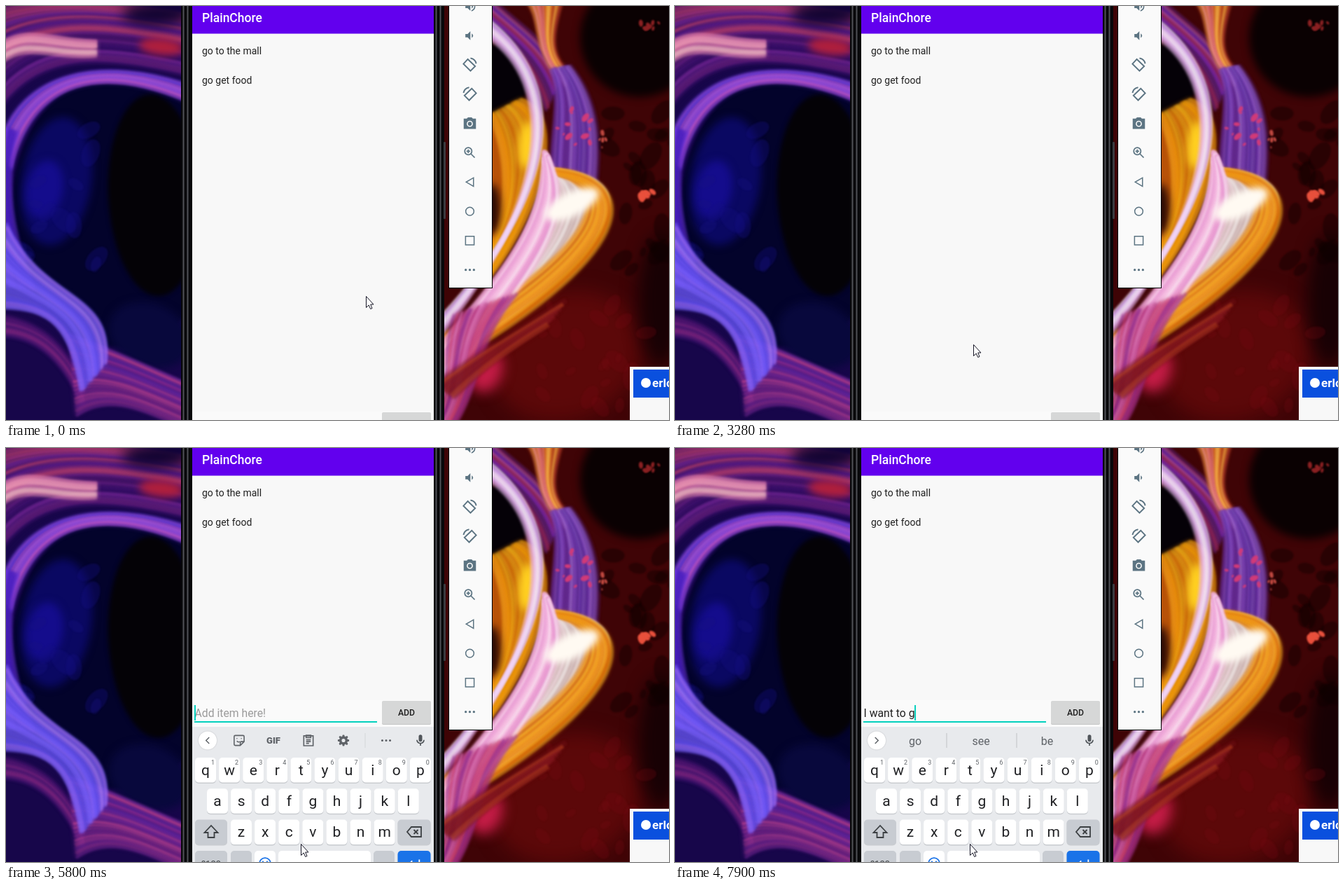
These frames come from a looping animation (947 px wide and 591 px high, 8 s). An HTML page with a canvas:

```html
<!DOCTYPE html>
<html lang="en">
<head>
<meta charset="utf-8">
<title>Todo list on a phone</title>
<style>
html, body { margin: 0; width: 100%; height: 100%; overflow: hidden; background: #000; }
canvas { display: block; }
</style>
</head>
<body>
<canvas id="stage" width="947" height="591"></canvas>
<script>
const W = 947, H = 591, LOOP = 8000, STEP = 120;
const stage = document.getElementById('stage');
let c = stage.getContext('2d');

// ---------- helpers ----------
const numbers = s => s.match(/-?\d+/g).map(Number);
const mix = (a, b, u) => a + (b - a) * u;

let seed = 7;
const random = () => (seed = seed * 16807 % 2147483647) / 2147483647;

function rect(color, x, y, w, h, r = 0) {
  c.fillStyle = color;
  c.beginPath();
  c.roundRect(x, y, w, h, r);
  c.fill();
}

function text(s, x, y, size, color, align = 'left', weight = 400) {
  c.font = `${weight} ${size}px Roboto, sans-serif`;
  c.textAlign = align;
  c.fillStyle = color;
  c.fillText(s, x, y);
}

function disc(color, x, y, r) {
  c.fillStyle = color;
  c.beginPath();
  c.arc(x, y, r, 0, 7);
  c.fill();
}

// Soft ellipse.
function glow(color, x, y, rx, ry, tilt = 0, blur = 6) {
  c.filter = `blur(${blur}px)`;
  c.fillStyle = color;
  c.beginPath();
  c.ellipse(x, y, rx, ry, tilt, 0, 7);
  c.fill();
  c.filter = 'none';
}

// Smoke: overlapping threads blended between two Bezier edges.
function smoke(edgeA, edgeB, colors, count = 22) {
  const a = numbers(edgeA), b = numbers(edgeB);
  const [x0, y0, x1, y1, x2, y2, x3, y3] = b;
  const palette = colors.split(' ');
  c.filter = 'blur(3px)';
  c.globalAlpha = 0.75;
  c.fillStyle = palette[0];
  c.beginPath();
  c.moveTo(a[0], a[1]);
  c.bezierCurveTo(...a.slice(2));
  c.lineTo(x3, y3);
  c.bezierCurveTo(x2, y2, x1, y1, x0, y0);
  c.fill();
  c.filter = 'blur(1.5px)';
  for (let i = 0; i < count; i++) {
    const p = a.map((v, k) => mix(v, b[k], i / (count - 1)));
    c.globalAlpha = 0.2 + 0.4 * random();
    c.strokeStyle = palette[Math.floor(random() * palette.length)];
    c.lineWidth = 2 + 6 * random();
    c.beginPath();
    c.moveTo(p[0], p[1]);
    c.bezierCurveTo(...p.slice(2));
    c.stroke();
  }
  c.filter = 'none';
  c.globalAlpha = 1;
}

function mottle(color, count, size, x, y, w, h) {
  for (let i = 0; i < count; i++) {
    const s = size * (0.4 + random());
    glow(color, x + random() * w, y + random() * h, s, s * 0.6, random() * 3, 1);
  }
}

// Icons live on a 24 unit grid centred on x, y.
function icon(x, y, size, color, d, filled, width = 2) {
  const path = new Path2D(d);
  c.save();
  c.translate(x - size / 2, y - size / 2);
  c.scale(size / 24, size / 24);
  c.fillStyle = c.strokeStyle = color;
  c.lineWidth = width;
  filled ? c.fill(path, 'evenodd') : c.stroke(path);
  c.restore();
}

const ring = (x, y, r) => `M${x - r} ${y}a${r} ${r} 0 1 0 ${2 * r} 0a${r} ${r} 0 1 0 ${-2 * r} 0z`;
const dots = ring(5, 12, 2) + ring(12, 12, 2) + ring(19, 12, 2);

// ---------- still parts ----------
function leftFlames() {
  rect('#17064a', 0, 0, 250, H);
  smoke('-10,0 60,-15 150,-10 260,10', '-10,150 50,60 150,75 260,100', '#571a70 #c2407e #7d2aa0 #2a0a60 #d84a66 #33107a', 30);
  glow('#0d0230', 215, 12, 50, 16, 0, 9);
  glow('#b01f3c', 222, 58, 32, 12, 0.1);
  smoke('-10,55 30,25 70,50 130,50', '-10,85 30,50 60,78 130,72', '#d878a8 #ffd8cc #f0a0b8', 9);

  glow('#03032b', 160, 290, 152, 196, 0, 2);
  glow('#0a0862', 72, 250, 50, 92, 0.15);
  glow('#140c8c', 55, 262, 26, 42, 0.2);
  glow('#08083c', 205, 470, 60, 45, 0.4);
  glow('#040206', 212, 270, 66, 144, -0.05, 3);
  mottle('rgba(22,16,130,.35)', 14, 16, 20, 170, 110, 200);

  smoke('260,112 140,72 20,90 -10,200', '260,138 140,86 40,100 8,235', '#6a34c4 #c86ae8 #5a3ae0 #d85ab8 #9a50e0', 14);
  smoke('-10,170 -20,260 -20,330 -10,400', '18,180 -5,250 10,330 40,405', '#4a20c0 #7038e0 #b048d8', 10);
  smoke('-10,440 40,450 80,470 110,540', '-10,470 40,470 80,500 110,570', '#5a1a78 #8a2a80 #38106a', 10);
  smoke('90,470 150,490 200,515 260,540', '100,585 150,550 200,580 260,605', '#6a228a #b83490 #7a2aa0 #4a22a0 #d04a90', 20);
  smoke('0,310 50,425 155,405 142,510', '-10,430 70,430 92,460 108,550', '#6a58e8 #9a88ff #5a48e8 #b070f0 #7a60ff', 24);
}

function rightFlames() {
  rect('#3f0406', 626, 0, 321, H);
  glow('#5c0809', 800, 500, 110, 90, -0.4, 14);
  glow('#0a0102', 905, 45, 85, 85, 0, 6);
  glow('#180104', 935, 420, 32, 95, 0, 12);
  mottle('rgba(12,0,0,.4)', 24, 16, 855, 140, 95, 260);
  mottle('rgba(120,10,18,.28)', 22, 15, 750, 420, 170, 160);

  glow('#050107', 705, 105, 42, 52, 0, 3);
  smoke('690,-15 720,20 780,50 795,100', '690,40 720,55 755,90 772,150', '#5a1f70 #7a2ad0 #e080d0 #a02858', 16);
  smoke('740,-10 770,20 745,60 800,115', '795,-10 780,40 775,70 805,95', '#d8641c #f08a1e #ffc050 #ff9ac0 #b02a30', 16);
  smoke('778,90 795,130 775,200 780,240', '805,85 850,140 848,200 842,262', '#6a30a8 #9a60d8 #4a1f90 #b888e8', 22);

  glow('#b85208', 690, 265, 34, 100, 0, 4);
  smoke('690,155 715,210 720,290 690,350', '735,132 800,150 775,280 690,390', '#e88c10 #ffc41c #d86a0a #ffae00 #f0a020', 24);
  glow('#ffd020', 745, 198, 13, 34, 0.1);
  glow('#2a0a04', 694, 290, 12, 36, 0);

  // pale flare with its warm right edge and pink left veil
  smoke('768,215 770,300 720,380 612,500', '770,235 890,240 930,300 620,520', '#fff0ee #ffffff #ffe8f4', 16);
  smoke('790,242 850,260 870,330 620,470', '780,232 900,240 935,340 620,520', '#e8820e #f09a14 #d8660a #ffc830 #c85a10', 18);
  smoke('768,205 770,300 720,370 612,490', '775,215 830,330 710,410 612,580', '#f4b0dc #ffd0f0 #ffffff #e080c8', 20);
  glow('#fffaf2', 808, 283, 42, 17, -0.45, 5);
  smoke('690,22 800,110 800,260 612,455', '690,45 782,110 785,270 612,480', '#d890e8 #ffe0ff #ffffff #b060d8', 8);

  glow('#c41c46', 685, 520, 24, 32, 0.3, 9);
  smoke('640,440 620,500 640,550 610,600', '730,410 670,480 680,540 640,600', '#b03078 #e888c8 #8a2a90 #e05070', 16);
  smoke('800,420 740,460 680,490 612,540', '770,460 720,490 680,520 640,560', '#6a1018 #c04a20 #8a1a20', 8);

  mottle('#d03a78', 12, 5, 785, 145, 50, 75);
  mottle('#e8503c', 6, 6, 904, 264, 22, 10);
  mottle('#c04840', 5, 4, 847, 180, 10, 24);
  mottle('#8a2022', 8, 4, 888, 22, 45, 10);
}

function panel(x, w, paint) {
  c.save();
  c.beginPath();
  c.rect(x, 0, w, H);
  c.clip();
  paint();
  c.restore();
}

function phoneBody() {
  rect('#08080a', 250, 0, 376, H);
  for (const x of [252, 258, 613, 619]) {
    rect('#2c2d31', x, 0, 3, H);
    rect('#505156', x + 1, 0, 1, H);
  }
  rect('#3a3b40', 625, 194, 3, 110, 1);
}

function sideBar() {
  const ink = '#5c7482', x = 662.5;
  const place = (row, size, d, filled, width) => icon(x, 0.5 + 41.8 * row, size, ink, d, filled, width);
  const speaker = 'M4 9v6h4l5 5V4L8 9zM15.500 8q5 4 0 8z';
  rect('#000', 632, -2, 63, 405);
  rect('#fafafa', 633, -2, 61, 404);
  place(0, 19, speaker + 'M15 3q7 2 7 9t-7 9v-2q5-2 5-7t-5-7z', true);
  place(1, 19, speaker, true);
  place(2, 23, 'M9 3.500L20 14L13 21L2.500 10.500zM13 2Q20 3 21.500 10', false);
  place(3, 23, 'M15 3.500L4 14L11 21L21.500 10.500zM11 2Q4 3 2.500 10', false);
  place(4, 21, 'M9 2L7 4H2V21H22V4H17L15 2z' + ring(12, 12.5, 5) + ring(12, 12.5, 3.2), true);
  place(5, 21, ring(9.5, 9.5, 5.8) + 'M14 14L20 20M6.500 9.500H12.500M9.500 6.500V12.500', false);
  place(6, 21, 'M18 5V19L6 12z', false, 1.7);
  place(7, 21, ring(12, 12, 6.7), false, 1.7);
  place(8, 21, 'M5 5H19V19H5z', false, 1.7);
  place(9, 20, dots, true);
}

function notice() {
  rect('#f8f8f8', 891, 515, 56, 76);
  rect('#0a50de', 896, 519, 51, 40);
  disc('#fff', 914, 538, 7);
  text('erlo', 923, 544, 17, '#fff', 'left', 700);
}

function buildBackdrop() {
  const layer = document.createElement('canvas');
  layer.width = W;
  layer.height = H;
  c = layer.getContext('2d');
  panel(0, 250, leftFlames);
  panel(626, 321, rightFlames);
  phoneBody();
  sideBar();
  notice();
  rect('#f8f8f8', 266, 0, 345, H);
  rect('#6200ee', 266, 0, 345, 39.5);
  text('PlainChore', 280, 22.5, 17.5, '#fff', 'left', 500);
  ['go to the mall', 'go get food'].forEach((s, i) => text(s, 280, 68.5 + 42 * i, 14, '#212121'));
  c = stage.getContext('2d');
  return layer;
}

// ---------- timeline ----------
const FOCUS = 3820, KEYS_IN = 4060, TYPE = 6170;

// Each move ends at a time after some screen steps; `bend` curves the way.
const moves = [
  { end: 0, steps: 1, to: [514, 414] },
  { end: 600, steps: 5, to: [444, 430], bend: [560, 470] },
  { end: 1120, steps: 2, to: [407, 392] },
  { end: 1830, steps: 1, to: [428, 393] },
  { end: 3550, steps: 6, to: [436, 600], bend: [420, 470] },
  { end: 4060, steps: 1, to: [433, 584] },
  { end: 4180, steps: 1, to: [433, 600] },
  { end: 4690, steps: 2, to: [412, 566] },
  { end: 4840, steps: 1, to: [421, 565] }
];

function pointerAt(t) {
  const i = moves.findLastIndex(m => t >= m.end - m.steps * STEP);
  const { end, steps, to, bend } = moves[i];
  const from = i ? moves[i - 1].to : to;
  const u = Math.min(1, Math.floor((t - end) / STEP + steps) / steps);
  return to.map((v, k) => {
    const b = bend ? bend[k] : (from[k] + v) / 2;
    return mix(mix(from[k], b, u), mix(b, v, u), u);
  });
}

const bursts = [
  { start: TYPE, gap: 120, keys: 'I wa' },
  { start: 6680, gap: 270, keys: 'nt' },
  { start: 7100, gap: 40, keys: ' to ' },
  { start: 7900, gap: 120, keys: 'g' }
];
const typedAt = t => bursts.map(({ start, gap, keys }) =>
  keys.slice(0, Math.max(0, Math.floor((t - start) / gap) + 1))).join('');

const suggestions = {
  '': "I I'm I'll", 'I': "I I'm I'll", 'I ': 'am have will', 'I w': 'w will would',
  'I wa': 'wa was want', 'I wan': 'wan want wants', 'I want': 'want wants wanted',
  'I want ': 'to the you', 'I want t': 'to the you', 'I want to': 'to too the', 'I want to ': 'go see be'
};

// ---------- moving parts ----------
function inputRow(t) {
  const typed = typedAt(t), known = typedAt(t - STEP);
  const teal = '#03d0bd';
  c.save();
  c.translate(0, t < KEYS_IN ? 219 : 0);
  rect('#fafafa', 266, 360, 345, 231);
  rect('#c4c5c5', 537, 362, 70, 33, 2);
  rect('#d6d7d7', 537, 361, 70, 33, 2);
  text('ADD', 572, 382, 12.25, '#202020', 'center', 500);
  rect(t < FOCUS ? '#8a8a8a' : teal, 269, 390, 261, 2);
  text(typed || 'Add item here!', 269.5, 384, 15.75, typed ? '#212121' : '#9b9b9b');
  const width = s => c.measureText(s).width;
  const caretX = 269 + width(typed);
  if (/\S$/.test(known)) {
    const left = 269.5 + width(known.slice(0, known.lastIndexOf(' ') + 1));
    rect('#212121', left, 385, 269.5 + width(typed.trimEnd()) - left, 1);
  }
  const blinkOn = t >= FOCUS && Math.floor((t - FOCUS) / 490) % 2 === 0;
  if (typed || blinkOn) rect(teal, caretX, 367, 2, 22);
  c.restore();
}

function key(x, y, w, label, color = '#fff') {
  rect('#c9ccd0', x, y + 1, w, 36, 5);
  rect(color, x, y, w, 35.5, 5);
  if (label) text(label, x + w / 2, y + 24.5, 21, '#202124', 'center');
}

function toolRow(t) {
  const ink = '#5f6368', y = 417.5;
  c.shadowColor = 'rgba(0,0,0,.2)';
  c.shadowBlur = 2;
  disc('#fff', 288, y, 13);
  c.shadowBlur = 0;
  icon(288, y, 18, ink, t < TYPE ? 'M15 6L9 12L15 18' : 'M9 6L15 12L9 18', false);
  icon(592, y, 20, '#50555a', 'M9 5a3 3 0 0 1 6 0v6a3 3 0 0 1-6 0zM5 11h2a5 5 0 0 0 10 0h2a7 7 0 0 1-6 6.700V21h-2v-3.300a7 7 0 0 1-6-6.700z', true);
  if (t >= TYPE) {
    const words = suggestions[typedAt(t - STEP)] || 'go see be';
    words.split(' ').forEach((w, i) => text(w, 343 + 94.2 * i, 423.5, 16, ink, 'center'));
    for (const x of [387.5, 487.5]) rect('#bfc2c6', x, 407, 1, 21);
    return;
  }
  icon(333, y, 19, ink, 'M5 3H19Q21 3 21 5V14L14 21H5Q3 21 3 19V5Q3 3 5 3zM14 21V16Q14 14 16 14H21M8 8V9M16 8V9M8 13Q10 16 13 14', false);
  text('GIF', 382, 422, 13, ink, 'center', 900);
  icon(432, y, 20, ink, 'M4 4H20V21H4zM8 3H16V7H8zM8 11H16M8 14H16M8 17H13', false);
  icon(482, y, 19, ink, ring(12, 12, 5.5), false, 4.5);
  for (let a = 0; a < 6.2; a += Math.PI / 4) {
    rect(ink, 480.5 + 6.6 * Math.cos(a), y - 1.5 + 6.6 * Math.sin(a), 3, 3, 1);
  }
  rect('#d2d5d8', 512.5, 407, 1, 21);
  icon(543, y, 19, ink, dots, true);
}

function keyboard(t) {
  const grey = '#c8ccd2', ink = '#3c4043', pitch = 34.1;
  c.save();
  c.beginPath();
  c.rect(266, 0, 345, H);
  c.clip();
  if (t < KEYS_IN + STEP) {
    c.translate(0, 110);
    c.globalAlpha = 0.6;
  }
  rect('#e8eaed', 266, 398, 345, 200);
  toolRow(t);
  ['qwertyuiop', 'asdfghjkl', 'zxcvbnm'].forEach((row, r) =>
    [...row].forEach((k, i) => key(270 + 17 * r * (r + 1) / 2 + pitch * i, 442 + 44.3 * r, 30, k)));
  for (let i = 0; i < 10; i++) text((i + 1) % 10, 295.5 + pitch * i, 452, 9, '#5f6368', 'center');

  for (const y of [530.5, 575]) {
    key(270, y, 46, '', grey);
    key(559.5, y, 47, '', y < 575 ? grey : '#1a73e8');
  }
  icon(293, 548, 24, ink, 'M12 3L2.500 13H7.500V20H16.500V13H21.500z', false, 1.8);
  icon(583, 548, 24, ink, 'M8 5H22V19H8L2 12zM11.500 9L17.500 15M17.500 9L11.500 15', false, 1.8);
  text('?123', 293, 597.5, 13, ink, 'center');
  key(321, 575, 30, '', grey);
  key(355, 575, 30);
  key(389, 575, 132);
  key(525, 575, 30, '', grey);
  icon(370, 593, 21, '#1a73e8', ring(12, 12, 9) + ring(8.5, 9.5, 0.6) + ring(15.5, 9.5, 0.6), false);
  icon(583, 593, 22, '#fff', 'M20 6V12H5M9 8L5 12L9 16', false);
  c.restore();
}

const arrow = new Path2D('M0 0V16L3.700 12.500L6.200 18L8.500 17L6.200 11.500H10.500z');

function drawPointer(t) {
  const [x, y] = pointerAt(t);
  c.save();
  c.translate(Math.round(x) + 0.5, Math.round(y) + 0.5);
  c.fillStyle = '#fff';
  c.strokeStyle = '#151525';
  c.fill(arrow);
  c.stroke(arrow);
  c.restore();
}

const backdrop = buildBackdrop();

function frame(now) {
  const t = now % LOOP;
  c.drawImage(backdrop, 0, 0);
  inputRow(t);
  if (t >= KEYS_IN) keyboard(t);
  drawPointer(t);
  requestAnimationFrame(frame);
}
requestAnimationFrame(frame);
</script>
</body>
</html>
```
